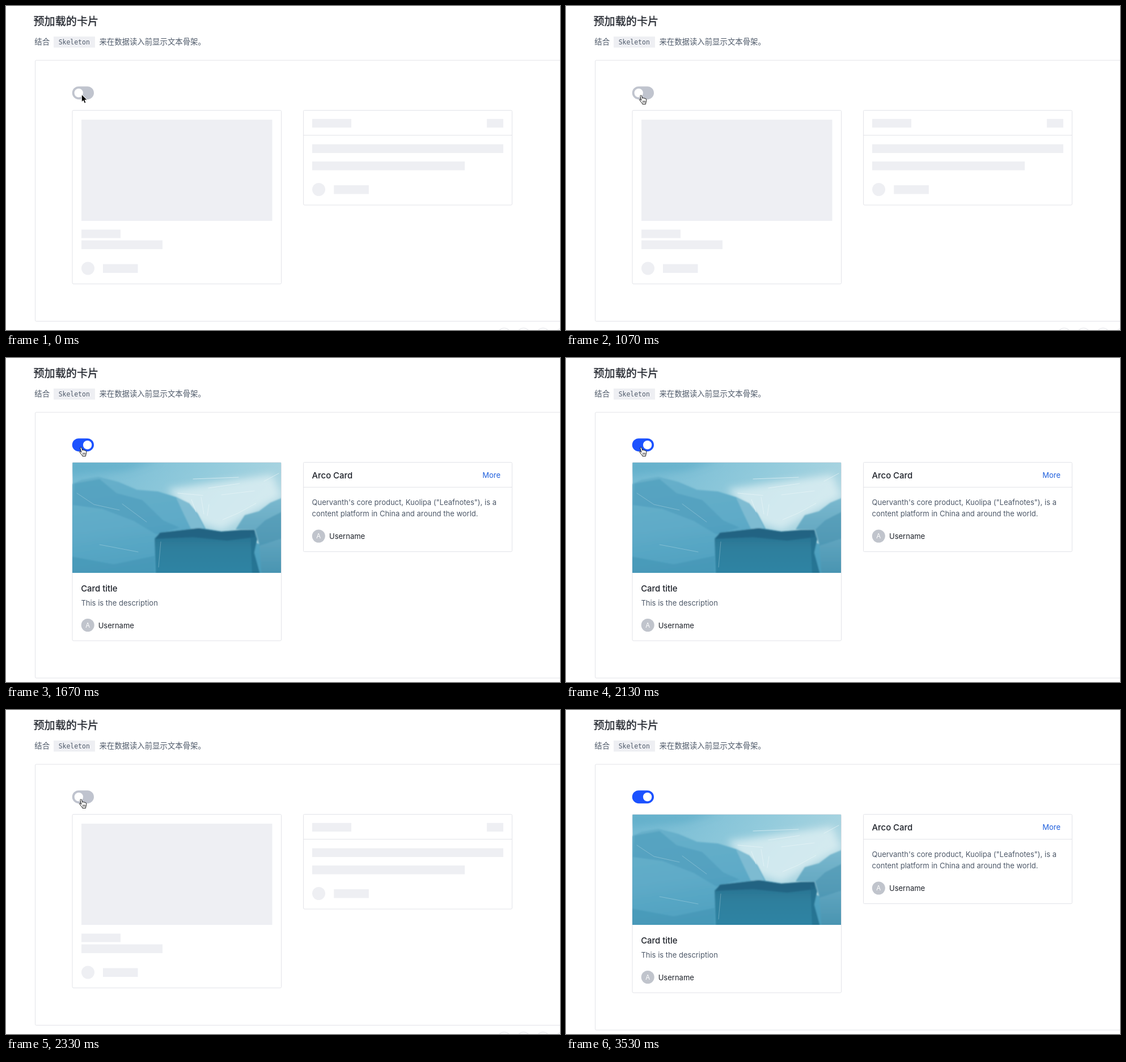
These frames come from a looping animation (977 by 573 pixels, 4010 ms). An HTML page:

```html
<!DOCTYPE html>
<html lang="zh-CN">
<head>
<meta charset="utf-8">
<title>Card preloading</title>
<style>
html, body { margin: 0; width: 100%; height: 100%; overflow: hidden; background: #fff; }
svg { display: block; }
text { font: 13px Inter, "Noto Sans CJK SC", "Noto Sans CJK", sans-serif; fill: #1d2129; }
.cjk { font: 13.4px "Noto Sans CJK SC", "Noto Sans CJK", sans-serif; fill: #4e5969; }
.heading { font-size: 19.1px; font-weight: 500; fill: #1d2129; stroke: #1d2129; stroke-width: .3px; }
.code { font: 11.45px "DejaVu Sans Mono", monospace; fill: #4e5969; }
.title { font-size: 14.9px; font-weight: 500; }
.soft { fill: #4e5969; }
.link { fill: #1f5fdd; }
.initial { font-size: 11.5px; fill: #fff; text-anchor: middle; }
.line { fill: none; stroke: #e2e3e8; }
.bars { fill: #eeeff3; }
.avatar { fill: #c0c4cc; }
</style>
</head>
<body>
<svg width="977" height="573" viewBox="0 0 977 573">
  <defs>
    <linearGradient id="sky" x2="1" y2=".5">
      <stop stop-color="#70b8d2"/><stop offset=".55" stop-color="#93cbdc"/><stop offset="1" stop-color="#b4d9e3"/>
    </linearGradient>
    <linearGradient id="ice" x2=".3" y2="1">
      <stop stop-color="#68b0ca"/><stop offset=".5" stop-color="#5fabc8"/><stop offset="1" stop-color="#4c9fbe"/>
    </linearGradient>
    <linearGradient id="block" x2="0" y2="1">
      <stop stop-color="#286d8b"/><stop offset=".45" stop-color="#2f7f9d"/><stop offset="1" stop-color="#2f84a4"/>
    </linearGradient>
    <linearGradient id="rock" x2="0" y2="1">
      <stop stop-color="#7bb9cf"/><stop offset="1" stop-color="#4994b1"/>
    </linearGradient>
    <filter id="haze" x="-30%" y="-30%" width="160%" height="160%"><feGaussianBlur stdDeviation="7"/></filter>
    <filter id="soften"><feGaussianBlur stdDeviation="1.2"/></filter>
    <clipPath id="photo"><path d="M117.5 185H485V380H117.5Z"/></clipPath>
  </defs>

  <text class="cjk heading" x="48.5" y="33.8">预加载的卡片</text>
  <text class="cjk" x="50.3" y="68.3">结合</text>
  <path class="bars" d="M84 54h73v19.5h-73z"/>
  <text class="code" x="92.7" y="67.8">Skeleton</text>
  <text class="cjk" x="164.4" y="68.3">来在数据读入前显示文本骨架。</text>

  <g id="skeleton">
    <g class="line">
      <rect x="51.5" y="96" width="960" height="461.5" rx="2"/>
      <rect x="117" y="184.5" width="368.5" height="307" rx="2"/>
      <rect x="524.5" y="184.5" width="368" height="167.5" rx="2"/>
      <path d="M524.5 228.5h368"/>
      <circle cx="878.5" cy="581.5" r="12"/><circle cx="912.7" cy="581.5" r="12"/>
      <circle cx="947" cy="581.5" r="12"/><circle cx="981.3" cy="581.5" r="12"/>
    </g>
    <g class="bars">
      <path d="M133 201h336.5v179h-336.5z M133 395.5h69v15h-69z M133 414.5h143v15.5h-143z M171 456.5h61.5v15.5h-61.5z"/>
      <path d="M540 199.7h69v15.3h-69z M848 199.7h29v15.3h-29z M540 244.5h337v15.5h-337z M540 275h269v15.5h-269z M578.3 317h61.5v15.5h-61.5z"/>
      <circle cx="144.5" cy="464" r="11.5"/><circle cx="551.5" cy="324.5" r="11.5"/>
    </g>
  </g>

  <g id="loaded">
    <g class="line">
      <rect x="51.5" y="96" width="960" height="470" rx="2"/>
      <rect x="117" y="184.5" width="368.5" height="315.5" rx="2"/>
      <rect x="524.5" y="184.5" width="368" height="158" rx="2"/>
      <path d="M524.5 228.5h368"/>
    </g>
    <g clip-path="url(#photo)">
      <path fill="url(#sky)" d="M117 185H486V380H117Z"/>
      <g filter="url(#haze)">
        <path fill="#deeff3" opacity=".8" d="M285 232L385 218L470 206L486 245L430 275L380 305L335 290Z"/>
        <path fill="#5caac6" opacity=".6" d="M110 180H270L210 200L110 207Z"/>
      </g>
      <g filter="url(#soften)">
        <path fill="url(#ice)" d="M110 226L134 215L163 210L198 219L231 233L268 236L300 246L323 257L338 275L352 302L400 310L486 345V390H110Z"/>
        <path fill="#8fc5d7" opacity=".65" d="M300 247L321 256L335 272L350 301L326 302L313 275Z"/>
        <path fill="#3f92b2" opacity=".38" d="M120 222L165 214L195 239L240 251L277 287L306 300L265 312L225 288L170 267L118 260Z"/>
        <path fill="url(#rock)" d="M490 246L466 256L446 271L421 278L405 303L440 304L447 330L450 382H490Z"/>
        <path fill="#458fae" opacity=".5" d="M490 270L457 287L438 305L447 332L490 318Z"/>
        <path fill="#3385a6" opacity=".3" d="M110 350L190 365L262 350V390H110Z"/>
        <path fill="url(#block)" d="M262 319L272 309L307 305L340 301L379 307L414 304L438 304L443 321L438 344L448 382H264Z"/>
        <path fill="#205f7e" opacity=".7" d="M271 309L340 301L379 307L438 304L439 317L390 323L330 317L264 320Z"/>
        <path fill="#236b8b" opacity=".6" d="M431 308L442 318L437 346L448 382H434Z"/>
      </g>
      <g fill="none" stroke="#eaf6f8" stroke-linecap="round" opacity=".65">
        <path d="M327 250l8 22M344 246l5 30M358 259l-3 20M303 239l44 4M357 230l55-8M380 242l58-7M382 286l26-11l33-18M455 218l26-14M330 214l80-3"/>
        <path opacity=".45" d="M125 239l30 20l45 10M205 258l43 32M165 330l68 13M273 325l-4 45"/>
      </g>
    </g>
    <text class="title" x="132.2" y="412.5">Card title</text>
    <text class="soft" x="132.4" y="437.5">This is the description</text>
    <circle class="avatar" cx="144.2" cy="472.5" r="11.5"/>
    <text class="initial" x="144.2" y="476.7">A</text>
    <text x="162.7" y="477.5">Username</text>

    <text class="title" x="539.5" y="213">Arco Card</text>
    <text class="link" x="840.3" y="212.2">More</text>
    <text class="soft" x="539.5" y="259.7">Quervanth's core product, Kuolipa ("Leafnotes"), is a</text>
    <text class="soft" x="539.5" y="279.8">content platform in China and around the world.</text>
    <circle class="avatar" cx="551.3" cy="315" r="11.5"/>
    <text class="initial" x="551.3" y="319.2">A</text>
    <text x="570" y="320">Username</text>
  </g>

  <rect id="track" x="116.7" y="142.2" width="38.3" height="23" rx="11.5"/>
  <circle id="knob" cy="153.7" r="7.7" fill="#fff"/>

  <path id="arrow" d="M0 0V13.5L3.1 10.6L5.1 15.4L7.6 14.4L5.6 9.7H10Z" stroke="#fff"/>
  <g id="hand" fill="#fff" stroke="#111" stroke-linejoin="round">
    <path d="M4.3 10L2.6 3.2C1.9.7 4.4 0 5.1 2.3L6.3 6.3C6.7 5 8.6 5.2 8.9 6.5C9.4 5.6 10.9 5.9 11.2 7.2C12 6.6 13.3 7 13.3 8.6C13.4 11 13.2 12.6 12.2 14.4L12.1 16.5H6.3L5.8 15C4.4 13.3 2.5 10.9 1.2 9.4C.2 8 1.8 7.2 2.8 8.2Z"/>
    <path d="M7.2 10.5v3.5M9.1 10.5v3.5M11 10.5v3.5" stroke-width=".8"/>
  </g>
</svg>
<script>
const LOOP = 4010;
const SWITCH_MS = 200;
const OFF = [192, 196, 206], ON = [28, 82, 255];
const el = id => document.getElementById(id);
const [skeleton, loaded, track, knob, arrow, hand] =
  ["skeleton", "loaded", "track", "knob", "arrow", "hand"].map(el);

const progress = (t, start, length) => Math.min(1, Math.max(0, (t - start) / length));
const easeOut = p => 1 - (1 - p) ** 3;
const toggle = (t, start) => easeOut(progress(t, start, SWITCH_MS));
const mix = (a, b, p) => a + (b - a) * p;
const show = (node, visible) => { node.style.display = visible ? "" : "none"; };
const place = (node, x, y) => node.setAttribute("transform", `translate(${x} ${y})`);

function draw(t) {
  const isLoaded = (t >= 1400 && t < 2170) || t >= 2970;
  show(loaded, isLoaded);
  show(skeleton, !isLoaded);

  const on = toggle(t, 1400) - toggle(t, 2170) + toggle(t, 2956);
  knob.setAttribute("cx", mix(128.2, 143.6, on));
  track.setAttribute("fill", `rgb(${OFF.map((c, i) => Math.round(mix(c, ON[i], on)))})`);

  // The pointer rests on the switch, then leaves over the top edge.
  const leave = progress(t, 3200, 230) ** 1.5;
  const dx = -101 * leave, dy = -178 * leave;
  const overSwitch = t >= 930 && dy > -15;
  show(hand, overSwitch);
  show(arrow, !overSwitch && leave < 1);
  place(hand, 128.5 + dx, 157 + dy);
  place(arrow, 133.3 + dx, 156.5 + dy);
}

let start;
function tick(now) {
  start ??= now;
  draw((now - start) % LOOP);
  requestAnimationFrame(tick);
}
draw(0);
requestAnimationFrame(tick);
</script>
</body>
</html>
```
